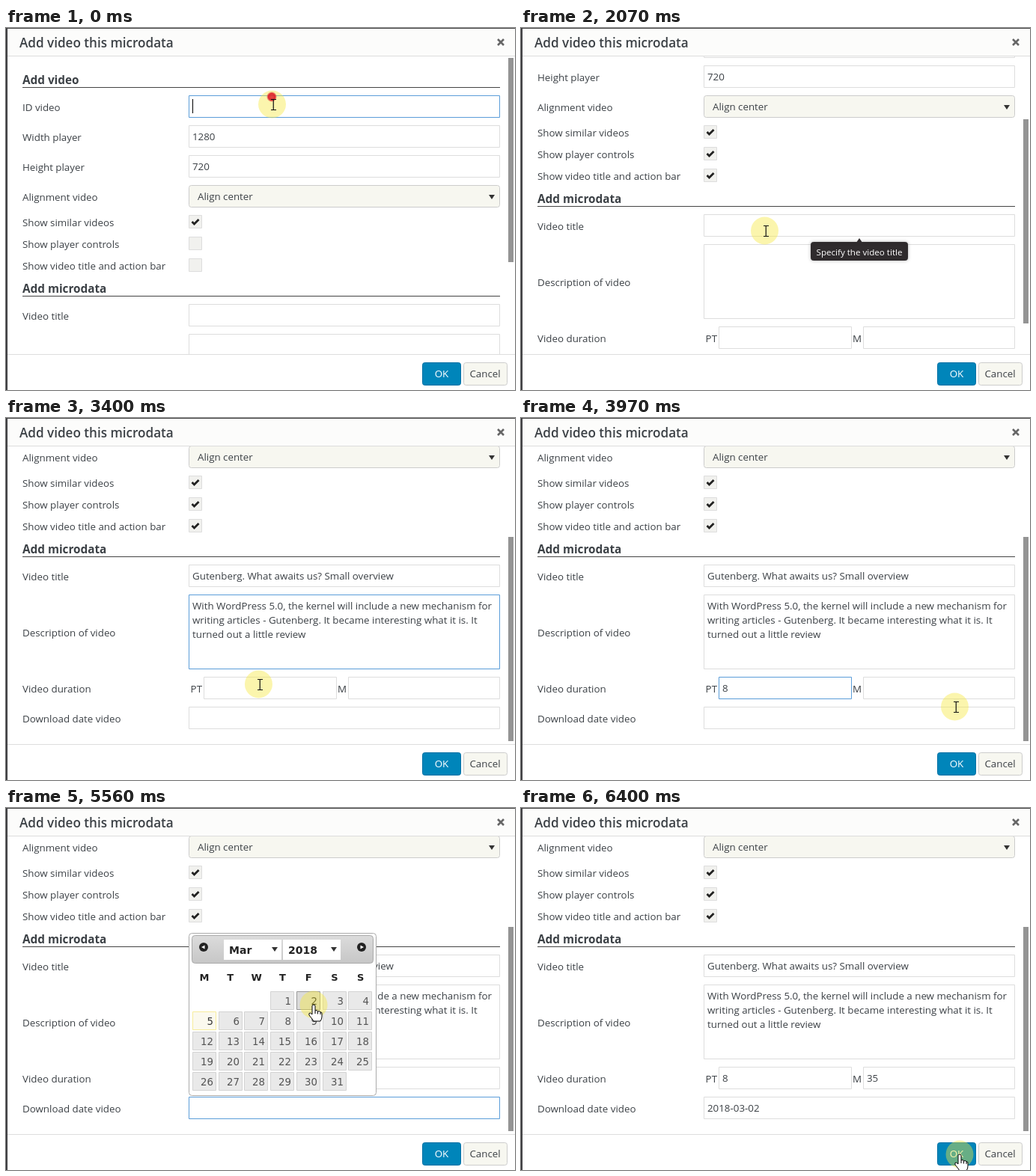
An HTML page with a canvas that plays this animation: 680 px wide and 484 px high, repeating every 6.43 s.

```html
<!DOCTYPE html>
<html lang="en">
<head>
<meta charset="utf-8">
<title>Add video dialog</title>
<style>
html, body { margin: 0; width: 100%; height: 100%; overflow: hidden; background: #fff; }
canvas { display: block; }
</style>
</head>
<body>
<canvas id="stage" width="680" height="484"></canvas>
<script>
const c = document.getElementById('stage').getContext('2d');
const LOOP = 6430;
const UI = '"Open Sans", "Noto Sans", sans-serif';
const CAL = '"DejaVu Sans", sans-serif';
const BODY = '13.33px ' + UI, HEAD = 'bold 15.3px ' + UI, TIP = '11.6px ' + UI;
const INK = '#3c4146', TRAVEL = 300;

// Pointer stops: arrival time, x, y, and whether it clicks there
const stops = [
  [-25, 355, 92, true], [0, 357, 102], [640, 340, 194], [970, 250, 289, true],
  [1180, 250, 325, true], [1345, 281, 314], [2040, 327, 271], [2250, 327, 271, true],
  [2560, 305, 335], [2710, 278, 383], [2830, 300, 310, true], [3470, 345, 363, true],
  [3970, 581, 386], [4110, 578, 366, true], [5100, 400, 402, true], [5540, 411, 263],
  [5620, 411, 263, true], [6070, 361, 405], [6390, 586, 463]
];

const rows = [
  { head: 'Add video' },
  { label: 'ID video', inputs: [
    { focus: [0, 2250], at: 540, text: 'https://www.youtube.com/watch?v=Rt0nIManqrQ' }] },
  { label: 'Width player', inputs: [{ text: '1280' }] },
  { label: 'Height player', inputs: [{ text: '720' }] },
  { label: 'Alignment video', select: 'Align center' },
  { label: 'Show similar videos', checked: 0 },
  { label: 'Show player controls', checked: 975 },
  { label: 'Show video title and action bar', checked: 1185 },
  { head: 'Add microdata' },
  { label: 'Video title', inputs: [
    { focus: [2250, 2840], at: 2440, text: 'Gutenberg. What awaits us? Small overview' }] },
  { label: 'Description of video', tall: 70, inputs: [
    { focus: [2840, 3480], at: 3000, text: 'With WordPress 5.0, the kernel will include a new mechanism for\n' +
      'writing articles - Gutenberg. It became interesting what it is. It\nturned out a little review' }] },
  { label: 'Video duration', inputs: [
    { prefix: 'PT', x: 264, w: 178, focus: [3480, 4120], at: 3620, text: '8' },
    { prefix: 'M', x: 457, w: 203, focus: [4120, 5110], at: 4330, text: '35', keyTime: 150 }] },
  { label: 'Download date video', inputs: [{ focus: [5110, 5640], at: 5640, text: '2018-03-02' }] }
];

const between = (t, a, b) => t >= a && t < b;
const ease = u => u * u * (3 - 2 * u);
const ramp = (t, a, b) => Math.min(1, Math.max(0, (t - a) / (b - a)));

function text(s, x, y, font = BODY, color = INK, align = 'left') {
  c.font = font;
  c.fillStyle = color;
  c.textAlign = align;
  c.fillText(s, x, y);
}
function rect(x, y, w, h, color) {
  c.fillStyle = color;
  c.fillRect(x, y, w, h);
}
function box(x, y, w, h, fill, stroke, r = 0) {
  c.beginPath();
  c.roundRect(x + .5, y + .5, w - 1, h - 1, r);
  c.fillStyle = fill;
  c.fill();
  c.strokeStyle = stroke;
  c.lineWidth = 1;
  c.stroke();
}
function triangle(x, y, rx, ry, turn, color) {
  c.beginPath();
  for (let i = 0; i < 3; i++) {
    const a = turn + i * Math.PI * 2 / 3;
    c.lineTo(x + rx * Math.cos(a), y + ry * Math.sin(a));
  }
  c.fillStyle = color;
  c.fill();
}
function disc(x, y, r, color) {
  c.beginPath();
  c.arc(x, y, r, 0, 7);
  c.fillStyle = color;
  c.fill();
}
function stroke(d, color, width) {
  c.strokeStyle = color;
  c.lineWidth = width;
  c.stroke(new Path2D(d));
}
const down = (x, y) => triangle(x, y, 4.6, 4, Math.PI / 2, '#333');

function pointer(t) {
  const next = stops.findIndex(s => s[0] > t);
  if (next < 0) return stops[stops.length - 1].slice(1, 3);
  const [t0, x0, y0] = stops[next - 1], [t1, x1, y1] = stops[next];
  const u = ease(ramp(t, Math.max(t0, t1 - TRAVEL), t1));
  return [x0 + (x1 - x0) * u, y0 + (y1 - y0) * u];
}

const scrollAt = t => Math.round(120 * ease(ramp(t, 1450, 1740)) + 53 * ease(ramp(t, 2570, 2690)));

function input({ prefix, x = 244, w = 416, focus = [0, 0], at = 0, text: full, keyTime = 0 }, y, h, t) {
  const focused = between(t, ...focus);
  if (prefix) text(prefix, x - 2, y + 21, BODY, INK, 'right');
  box(x, y, w, h, '#fff', focused ? '#5b9dd9' : '#ddd');
  const keys = t < at ? 0 : keyTime ? 1 + Math.floor((t - at) / keyTime) : full.length;
  const lines = full.slice(0, keys).split('\n');
  lines.forEach((s, i) => text(s, x + 5, y + 20 + i * 19));
  const lastKey = t < at ? focus[0] : at + (Math.min(keys, full.length) - 1) * keyTime;
  if (focused && (t - lastKey) % 530 < 300) {
    const end = lines.length - 1;
    rect(Math.round(x + 5 + c.measureText(lines[end]).width), y + 5 + end * 19, 1, 19, '#000');
  }
}

function form(t) {
  const scroll = scrollAt(t);
  c.save();
  c.beginPath();
  c.rect(2, 38, 678, 398);
  c.clip();
  rect(671, 40 + Math.round(scroll * .686), 7, 273, '#949494');
  c.translate(0, -scroll);
  let y = 58;
  for (const { head, label, inputs, select, checked, tall = 0 } of rows) {
    const isCheck = checked !== undefined;
    if (head) {
      text(head, 22, y + 17, HEAD);
      rect(22, y + 21, 638, 1, '#444');
    } else {
      text(label, 22, y + (isCheck ? 15 : 21 + tall / 2));
    }
    if (inputs) inputs.forEach(f => input(f, y, 30 + tall, t));
    if (select) {
      box(244, y, 416, 30, '#f7f7f0', '#ccc', 3);
      text(select, 256, y + 20);
      down(649, y + 15);
    }
    if (isCheck) {
      box(244, y, 18, 18, '#f1f1ee', '#ddd');
      if (t >= checked) stroke(`M248.5 ${y + 9}l3 3l6 -6`, '#222', 2.8);
    }
    y += head ? 32 : isCheck ? 29 : 40 + tall;
  }
  c.restore();
}

function frame() {
  rect(2, 1, 678, 36, '#fcfcfb');
  rect(2, 37, 678, 1, '#ddd');
  rect(0, 0, 680, 1, '#484848');
  rect(0, 0, 2, 484, '#3f3f42');
  text('Add video this microdata', 18, 26, '600 17.1px ' + UI);
  stroke('M657 15l8 8m0 -8l-8 8', '#666', 2.6);
  rect(2, 436, 678, 1, '#ddd');
  box(556, 447, 52, 31, '#0085ba', '#006fa3', 3);
  text('OK', 582, 467, BODY, '#fff', 'center');
  box(611, 447, 59, 31, '#f7f7f0', '#ccc', 3);
  text('Cancel', 640, 467, BODY, INK, 'center');
}

function tooltip(y, w, ...lines) {
  const dark = '#302c2e';
  c.shadowColor = 'rgba(0,0,0,.25)';
  c.shadowBlur = 4;
  box(452 - w / 2, y, w, 9 + lines.length * 16, dark, dark, 3);
  c.shadowBlur = 0;
  triangle(452, y, 6, 5, -Math.PI / 2, dark);
  lines.forEach((s, i) => text(s, 452, y + 17.5 + i * 16, TIP, '#fff', 'center'));
}

function calendar(t, [px, py]) {
  c.globalAlpha = ramp(t, 5140, 5240) * (1 - ramp(t, 5640, 5740));
  box(244, 167, 251, 218, '#fff', '#aaa', 4);
  const shade = c.createLinearGradient(0, 170, 0, 208);
  shade.addColorStop(0, '#dcdcdc');
  shade.addColorStop(1, '#c6c6c6');
  box(248, 170, 243, 38, shade, '#aaa', 4);
  [264, 475].forEach((x, i) => {
    disc(x, 186, 6, '#222');
    triangle(x, 186, 3, 3, i ? 0 : Math.PI, '#fff');
  });
  ['Mar', '2018'].forEach((s, i) => {
    const x = 291 + i * 79;
    rect(x, 176, 77, 27, '#fff');
    text(s, x + 7, 195, 'bold 14px ' + CAL, '#222');
    down(x + 68, 188);
  });
  [...'MTWTFSS'].forEach((s, i) => text(s, 265 + i * 34.8, 231, 'bold 13px ' + CAL, '#222', 'center'));
  for (let day = 1; day <= 31; day++) {
    const n = day + 2;
    const x = Math.round(249 + n % 7 * 34.7), y = 245 + Math.floor(n / 7) * 27;
    const hover = between(px, x, x + 32) && between(py, y, y + 25);
    const [fill, edge, ink] = hover ? ['#dadada', '#999', '#212121']
      : day === 5 ? ['#fbf9ee', '#f7ec9c', '#363636'] : ['#e9e9e9', '#d3d3d3', '#555'];
    box(x, y, 32, 25, fill, edge);
    text(day, x + 28, y + 18, '13.3px ' + CAL, ink, 'right');
  }
  c.globalAlpha = 1;
}

// A red dot that opens into a fading ring
function ripple(u, x, y) {
  const r = 6.5 + u * 6.5;
  const red = a => `rgba(222,30,40,${Math.max(0, a) * (1 - u * .6)})`;
  const g = c.createRadialGradient(x, y, 0, x, y, r);
  g.addColorStop(0, red(1 - u * 1.6));
  g.addColorStop(.3, red(1 - u * 1.2));
  g.addColorStop(.65, red(1));
  g.addColorStop(1, red(0));
  disc(x, y, r, g);
}

const hand = 'M-2 13V1.8Q-2 0 0 0Q2 0 2 1.8V8Q5 6.5 5.5 9Q8.5 7.5 9 10Q11.5 9.5 11 12V16Q11 19 9 22H0L-2 19L-6 14Q-7 11 -4.5 11Z';

function drawPointer(t, [x, y]) {
  const overChecks = !scrollAt(t) && between(y, 250, 330);
  const overCalendar = between(t, 5140, 5740) && y < 385;
  const isHand = overChecks || overCalendar || y > 440;
  disc(isHand ? x : x - 1.5, y, 18.5, 'rgba(246,232,60,.42)');
  for (const [at, cx, cy, click] of stops) {
    const age = (t - at) / 300;
    if (click && between(age, 0, 1)) ripple(age, cx, cy);
  }
  c.save();
  c.translate(Math.round(x), Math.round(y));
  if (isHand) {
    c.fillStyle = '#fff';
    c.fill(new Path2D(hand));
    stroke(hand + 'M2 8v4M5.5 9v3.5M9 10v3', '#000', 1);
  } else {
    stroke('M.25 -7V8M-3 -6.5H4M-3 7.5H4', '#111', 1.2);
  }
  c.restore();
}

function draw() {
  const t = (performance.now() - start) % LOOP;
  const at = pointer(t);
  rect(0, 0, 680, 484, '#fff');
  form(t);
  frame();
  if (between(t, 1950, 2280)) tooltip(286, 130, 'Specify the video title');
  if (between(t, 2540, 2780)) tooltip(396, 216, 'Specify the video description of', 'movie');
  if (between(t, 5140, 5740)) calendar(t, at);
  drawPointer(t, at);
  requestAnimationFrame(draw);
}
const start = performance.now();
draw();
</script>
</body>
</html>
```
